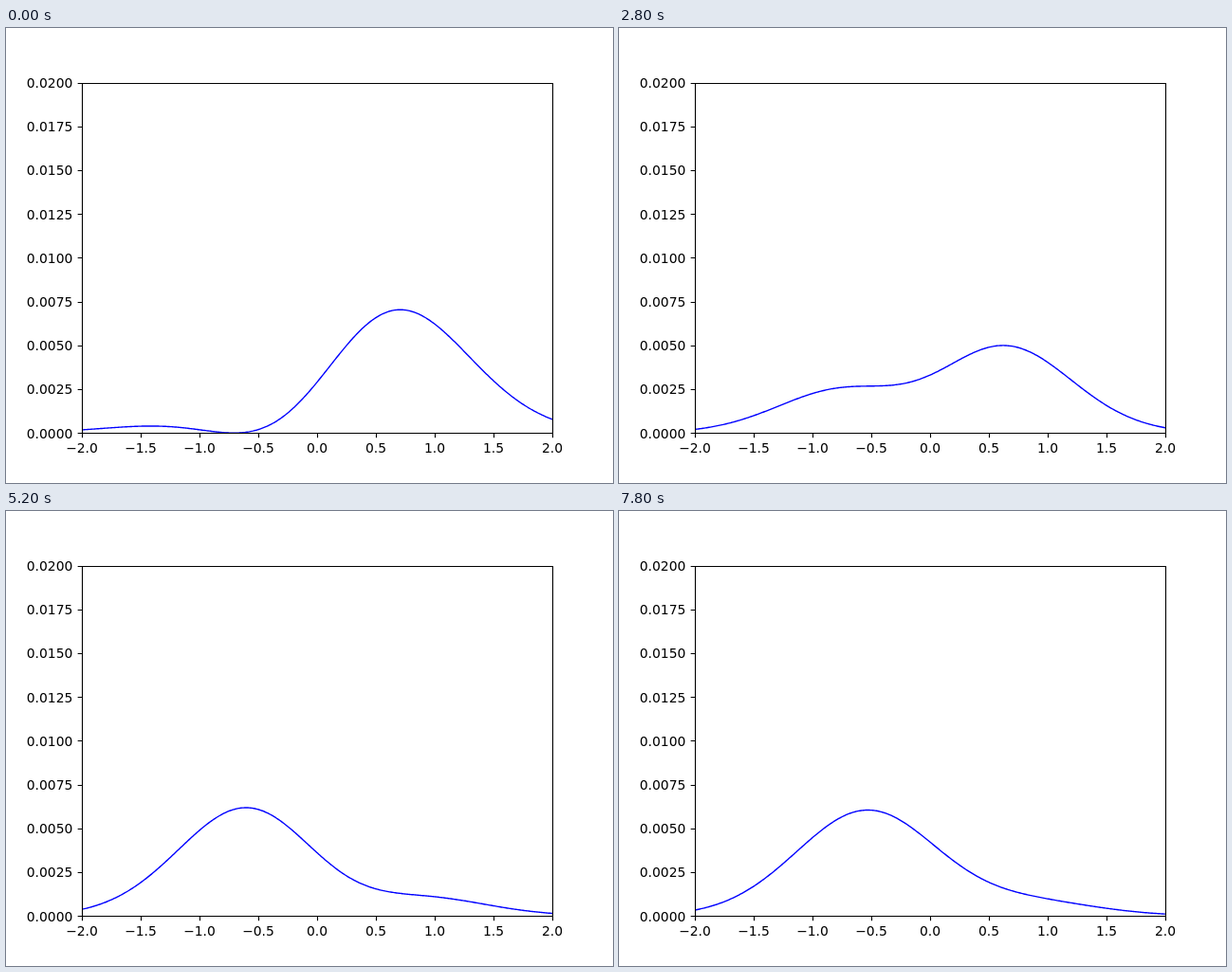
Animation, 640 px wide and 480 px high, one loop 8000 ms. Source, as an HTML page:

```html
<!DOCTYPE html>
<html lang="en">
<head>
<meta charset="utf-8">
<title>Probability density</title>
<style>
  html, body { margin: 0; width: 100%; height: 100%; overflow: hidden; background: #fff; }
  svg { display: block; width: 100vw; height: 100vh; }
  text { font: 13.889px "DejaVu Sans", sans-serif; }
  .axes { fill: none; stroke: #000; stroke-width: 1.11; }
  .curve { fill: none; stroke: #00f; stroke-width: 1.39; stroke-linejoin: round; }
</style>
</head>
<body>
<svg viewBox="0 0 640 480">
  <clipPath id="inside"><rect x="80" y="57.6" width="496" height="369.6"/></clipPath>
  <path class="curve" id="curve" clip-path="url(#inside)"/>
  <path class="axes" id="axes"/>
  <g id="labels"></g>
</svg>
<script>
const STEP = 200, LOOP = 8000, SAMPLES = 400;
const LEFT = 80, BOTTOM = 427.2, WIDTH = 496, HEIGHT = 369.6, Y_MAX = 0.02;
const toX = x => LEFT + (x + 2) * WIDTH / 4;
const toY = density => BOTTOM - density / Y_MAX * HEIGHT;
const snap = v => Math.floor(v + 0.5) + 0.5;

const grid = Array.from({ length: SAMPLES }, (_, i) => i * 4 / (SAMPLES - 1) - 2);

// Relative phase of the two states: [step, radians]
const phases = [[0, 0], [10, 0.38], [14, 1.26], [20, 2.43], [26, 4], [30, 5.21], [39, 8.55]];

function phaseAt(step) {
  const next = Math.max(1, phases.findIndex(([at]) => at >= step));
  const [t0, from] = phases[next - 1], [t1, to] = phases[next];
  return from + (to - from) * (step - t0) / (t1 - t0);
}

// Two lowest oscillator states: their width breathes, the ground state slowly gains weight
function densities(step) {
  const squeeze = 1.08 - 0.08 * Math.cos(0.3 * step) * Math.exp(-step / 25);
  const gain = 0.00025 * step * step;
  const beat = Math.sqrt(8 * (1 - gain * gain)) * Math.cos(phaseAt(step));
  const raw = grid.map(x => {
    const y = x * squeeze;
    return (1 + gain + beat * y + 2 * (1 - gain) * y * y) * Math.exp(-y * y);
  });
  const total = raw.reduce((sum, v) => sum + v);
  return raw.map(v => v / total);
}

function label(x, y, text, anchor) {
  const node = document.createElementNS("http://www.w3.org/2000/svg", "text");
  node.setAttribute("x", x);
  node.setAttribute("y", y);
  node.setAttribute("text-anchor", anchor);
  node.textContent = text;
  document.getElementById("labels").append(node);
}

function drawAxes() {
  const left = snap(LEFT), right = snap(LEFT + WIDTH);
  const top = snap(BOTTOM - HEIGHT), bottom = snap(BOTTOM);
  let d = `M${left} ${top}H${right}V${bottom}H${left}Z`;
  for (let i = 0; i <= 8; i++) {
    const value = i / 2 - 2, density = i * Y_MAX / 8;
    const x = toX(value), y = toY(density);
    d += `M${snap(x)} ${bottom}v4.86M${left} ${snap(y)}h-4.86`;
    label(x, 448, value.toFixed(1).replace("-", "\u2212"), "middle");
    label(70.3, Math.ceil(y + 5), density.toFixed(4), "end");
  }
  document.getElementById("axes").setAttribute("d", d);
}

const curve = document.getElementById("curve");
let shown = -1;

function draw(now) {
  const step = Math.floor(now % LOOP / STEP);
  if (step === shown) return;
  shown = step;
  const points = densities(step).map((v, i) => `${toX(grid[i]).toFixed(2)} ${toY(v).toFixed(2)}`);
  curve.setAttribute("d", "M" + points.join("L"));
}

const start = performance.now();
function tick() {
  draw(performance.now() - start);
  requestAnimationFrame(tick);
}
drawAxes();
tick();
</script>
</body>
</html>
```
